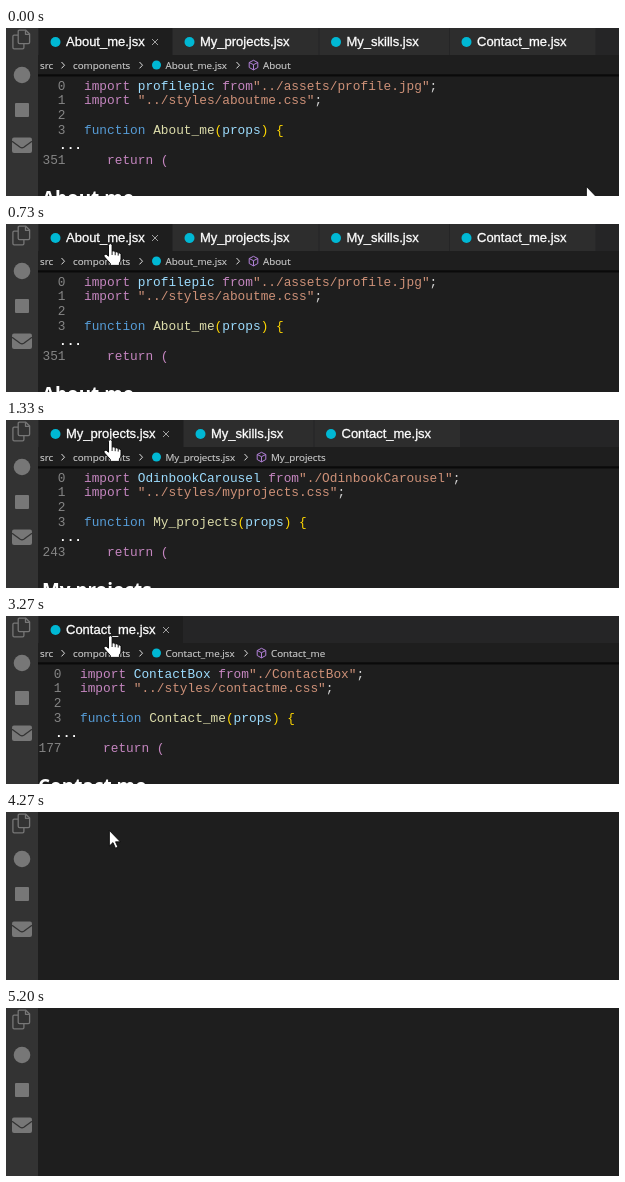
An HTML page that plays this animation: 613 px wide and 168 px high, repeating every 6000 ms.

```html
<!DOCTYPE html>
<html lang="en">
<head>
<meta charset="utf-8">
<title>Editor tabs</title>
<style>
  html, body { margin: 0; width: 100%; height: 100%; overflow: hidden; background: #1e1e1e; }
  svg { display: block; }
  text { white-space: pre; }
  .tab { font: 13px "Liberation Sans", Arial, sans-serif; fill: #fff; stroke: #fff; stroke-width: .3px; }
  .crumb { font: 9.8px "Open Sans", "Noto Sans", sans-serif; fill: #ccc; stroke: #ccc; stroke-width: .15px; }
  .code { font: 12.8px "Liberation Mono", "Courier New", monospace; fill: #d4d4d4; }
  .title { font: bold 18.9px "Open Sans", "Noto Sans", sans-serif; fill: #fff; }
  .num { fill: #858585; }
  .dots { fill: #fff; font-weight: bold; }
  .key { fill: #c586c0; }
  .fn { fill: #569cd6; }
  .name { fill: #dcdcaa; }
  .var { fill: #9cdcfe; }
  .str { fill: #ce9178; }
  .brace { fill: #ffd700; }
  .line { fill: none; stroke: #ddd; }
</style>
</head>
<body>
<svg width="613" height="168" viewBox="0 0 613 168">
  <defs>
    <linearGradient id="shade" x2="0" y2="1">
      <stop stop-color="#000"/>
      <stop offset="1" stop-color="#000" stop-opacity="0"/>
    </linearGradient>
  </defs>
  <rect width="613" height="168" fill="#1e1e1e"/>
  <g id="pages"></g>
  <rect width="32" height="168" fill="#333"/>
  <g fill="none" stroke="#777" stroke-width="1.3" stroke-linejoin="round">
    <path d="M13.5 2.2H19.8L23.6 6V14.3Q23.6 15.6 22.3 15.6H13.5Q12.2 15.6 12.2 14.3V3.5Q12.2 2.2 13.5 2.2Z"/>
    <path d="M19.5 2.4V6.3H23.4M12 7.2H8.2Q6.9 7.2 6.9 8.5V19.6Q6.9 20.9 8.2 20.9H16.6Q17.9 20.9 17.9 19.6V15.8"/>
  </g>
  <g fill="#777">
    <circle cx="16" cy="47" r="8.3"/>
    <rect x="9" y="75" width="14" height="14" rx="1"/>
    <rect x="6" y="109.5" width="20" height="15.5" rx="2"/>
  </g>
  <path d="M6 113.2L14.2 119.3Q16 120.5 17.8 119.3L26 113.2" fill="none" stroke="#333" stroke-width="1.3"/>
  <g id="arrow" fill="#fff" stroke="#000" stroke-width=".8">
    <path d="M.4 .5V16L4 12.6L6.5 18.2L8.9 17.1L6.5 11.8H11.3Z"/>
  </g>
  <g id="hand" transform="translate(97 19)" fill="#fff" stroke="#000" stroke-width=".9" stroke-linejoin="round">
    <path d="M5.5 2.5Q5.7 .6 7.3 .6Q9 .6 9.1 2.5V8Q11.4 7.3 12.2 8.8Q14.3 8.2 15.2 9.8Q17.7 9.4 18 11.5V16Q17.9 18.3 16.4 20V22.4H7.3V20.4L1.3 13.8Q.3 11.8 2 11.2Q3.4 10.9 5.5 13.2Z"/>
    <path d="M9.1 8V12M12.2 8.8V12.2M15.2 9.8V12.6" fill="none"/>
  </g>
</svg>
<script>
const LOOP = 6000;
const $ = id => document.getElementById(id);

const tabs = [
  { name: 'About_me', width: 134 },
  { name: 'My_projects', width: 145 },
  { name: 'My_skills', width: 129 },
  { name: 'Contact_me', width: 145 }
];

const pages = [
  { start: 0, symbol: 'About', symbolX: 257, x: 37, item: 'profilepic', from: '../assets/profile.jpg', style: '../styles/aboutme.css', last: 351 },
  { start: 1330, symbol: 'My_projects', symbolX: 265, x: 37, item: 'OdinbookCarousel', from: './OdinbookCarousel', style: '../styles/myprojects.css', last: 243 },
  { start: 2330, symbol: 'My_skills', symbolX: 251, x: 33, item: 'SkillBox', from: './SkillBox', style: '../utils/skillsData', last: 159 },
  { start: 3270, symbol: 'Contact_me', symbolX: 265, x: 33, item: 'ContactBox', from: './ContactBox', style: '../styles/contactme.css', last: 177 }
];
const CLOSED = 4270;

const text = (x, y, kind, body) => `<text x="${x}" y="${y}" class="${kind}">${body}</text>`;
const span = (kind, body) => `<tspan class="${kind}">${body}</tspan>`;
const dot = (x, y, r) => `<circle cx="${x}" cy="${y}" r="${r}" fill="#00b8d4"/>`;
const rect = (x, y, w, h, fill) => `<rect x="${x}" y="${y}" width="${w}" height="${h}" fill="${fill}"/>`;
const chevron = x => `<path class="line" d="M${x - 1.5} 34l3 3.2l-3 3.2"/>`;

function tabBar(first) {
  let x = 33, out = rect(32, 0, 581, 27, '#252526');
  tabs.slice(first).forEach((tab, i) => {
    const width = tab.width + (i ? 1.5 : 0);
    out += rect(x, 0, width - 1, 27, i ? '#2d2d2d' : '#1e1e1e')
      + dot(x + 16.5, 14, 5) + text(x + 27, 18, 'tab', tab.name + '.jsx');
    if (!i) out += `<path d="M${x + width - 21} 11l6 6m0-6l-6 6" stroke="#a0a0a0" fill="none"/>`;
    x += width;
  });
  return out;
}

function crumbs(name, page) {
  const x = page.symbolX;
  const cube = `<path d="M${x - 9.5} 32.3l4.3 2.2v5l-4.3 2.4l-4.3-2.4v-5zm-4.3 2.2l4.3 2.2l4.3-2.2m-4.3 2.2v5.2" fill="none" stroke="#b180d7"/>`;
  return text(34, 41, 'crumb', 'src') + chevron(57) + text(67, 41, 'crumb', 'components') + chevron(135)
    + dot(150.5, 37, 4.5) + text(159.5, 41, 'crumb', name + '.jsx') + chevron(x - 25)
    + cube + text(x, 41, 'crumb', page.symbol) + rect(32, 46.5, 581, 3, 'url(#shade)');
}

function code(name, page) {
  const string = s => span('str', `"${s}"`) + ';';
  const lines = [
    span('key', 'import ') + span('var', page.item) + span('key', ' from') + string(page.from),
    span('key', 'import ') + string(page.style),
    '',
    span('fn', 'function ') + span('name', name) + span('brace', '(') + span('var', 'props') + span('brace', ') {'),
    null,
    span('key', '   return (')
  ];
  const left = page.x - .5;
  return lines.map((line, i) => {
    const y = Math.floor(62 + i * 14.8);
    if (line === null) return text(left + 16.5, y, 'code dots', '...');
    const number = String(i === 5 ? page.last : i).padStart(3);
    return text(left, y, 'code num', number) + text(left + 41.5, y, 'code', line);
  }).join('');
}

$('pages').innerHTML = pages.map((page, i) => {
  const { name } = tabs[i];
  return `<g>${tabBar(i)}${crumbs(name, page)}${code(name, page)}${text(page.x - 1, 177, 'title', name.replace('_', ' '))}</g>`;
}).join('');
const groups = [...$('pages').children];

const mix = (a, b, p) => a + (b - a) * p;
const ease = p => p * p * (3 - 2 * p);
// Pointer steps taken by time t, the first at start and the last at end
const steps = (t, start, end, count) =>
  Math.max(0, Math.min(count, Math.floor((t - start) / (end - start) * (count - 1) + 1.001)));
const show = (node, on) => node.setAttribute('visibility', on ? 'visible' : 'hidden');

function pointer(t) {
  if (t < 730) {
    const p = ease(steps(t, 70, 670, 10) / 10);
    return [mix(580, 99, p), mix(158, 20, p)];
  }
  const p = steps(t, 4670, 5200, 9) / 9;
  return [mix(103, 62, p), mix(18, 180, p * (1 + p) / 2)];
}

function draw(now) {
  const t = now % LOOP;
  const current = t < CLOSED ? pages.filter(page => page.start <= t).length - 1 : -1;
  groups.forEach((group, i) => show(group, i === current));
  const hovering = t >= 730 && t < CLOSED;
  show($('hand'), hovering);
  show($('arrow'), !hovering);
  $('arrow').setAttribute('transform', `translate(${pointer(t).map(Math.round)})`);
}

const began = performance.now();
function tick() {
  draw(performance.now() - began);
  requestAnimationFrame(tick);
}
tick();
</script>
</body>
</html>
```
